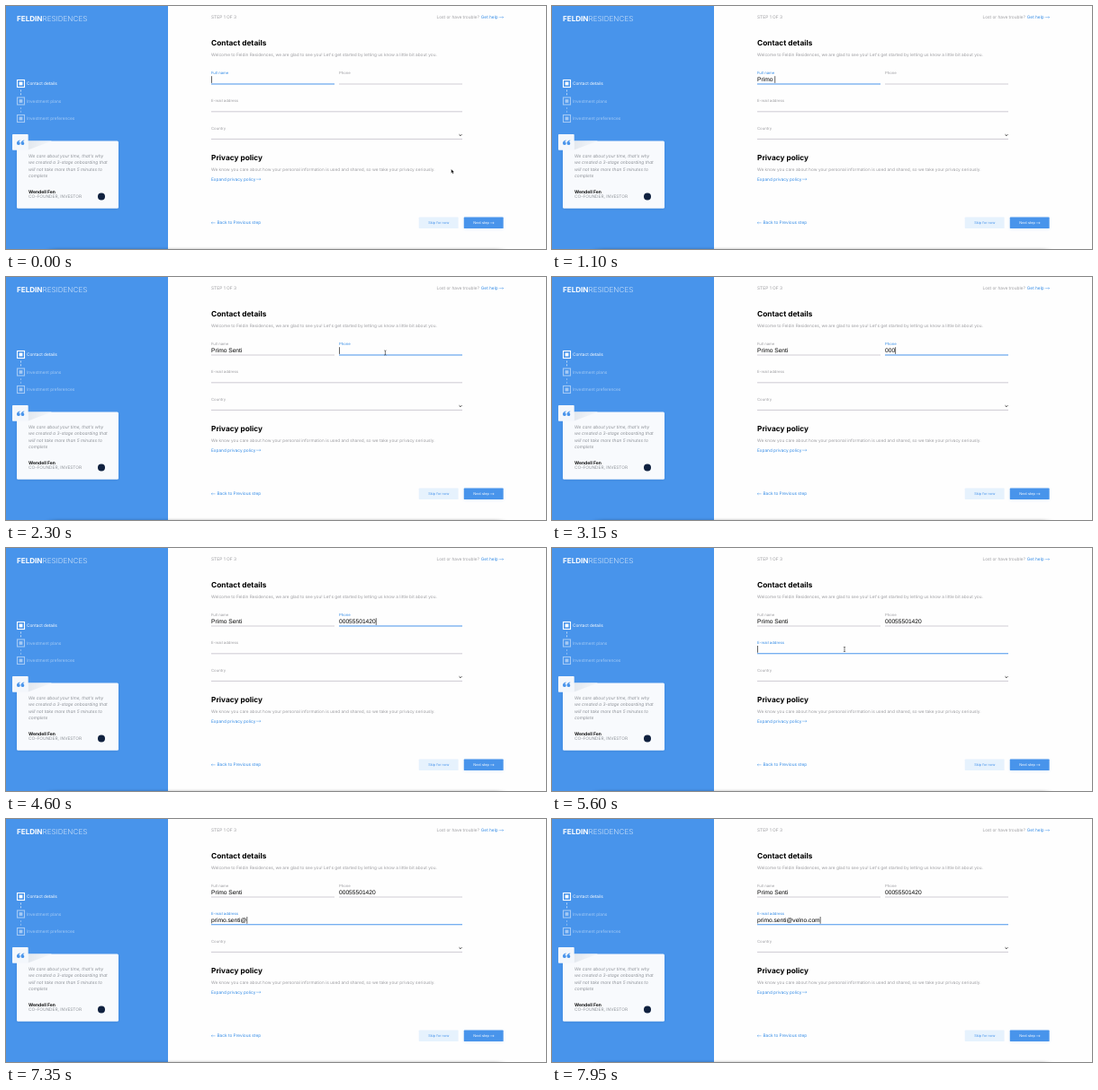
These frames come from a looping animation (600 px wide and 271 px high, 8000 ms). An HTML page:

```html
<!DOCTYPE html>
<html lang="en">
<head>
<meta charset="utf-8">
<title>Onboarding form</title>
<style>
  html, body { margin: 0; width: 100%; height: 100%; overflow: hidden; background: #fefefe; }
  svg { display: block; width: 100%; height: 100%; }
  text { font-family: Inter, sans-serif; white-space: pre; text-rendering: geometricPrecision; }
  .typed { font-family: "Liberation Sans", Arial, sans-serif; font-size: 6.667px; fill: #000; }
</style>
</head>
<body>
<svg id="stage" viewBox="0 0 600 271" xmlns="http://www.w3.org/2000/svg">
  <defs>
    <linearGradient id="fold" x1="0" y1="0" x2="1" y2="0">
      <stop offset="0" stop-color="#e3e8ee"/>
      <stop offset="1" stop-color="#f5f8fc"/>
    </linearGradient>
    <filter id="soft" x="-20%" y="-20%" width="140%" height="150%">
      <feGaussianBlur stdDeviation="1.6"/>
    </filter>
    <filter id="glow" filterUnits="userSpaceOnUse" x="0" y="255" width="600" height="30">
      <feGaussianBlur stdDeviation="5 1.5"/>
    </filter>
  </defs>
</svg>
<script>
const NS = 'http://www.w3.org/2000/svg';
const stage = document.getElementById('stage');
const LOOP = 8000;
const BLUE = '#4894eb', LINK = '#338be6', GRAY = '#9d9da1', RULE = '#c3bfca', WHITE = '#fff';

function add(tag, attrs, parent = stage) {
  const el = document.createElementNS(NS, tag);
  for (const key in attrs) el.setAttribute(key, attrs[key]);
  return parent.appendChild(el);
}

function label(str, x, y, size, fill, more = {}) {
  const el = add('text', { x, y, 'font-size': size, fill, ...more });
  el.textContent = str;
  return el;
}

function rect(x, y, width, height, fill, more = {}) {
  return add('rect', { x, y, width, height, fill, ...more });
}

function rule(x1, x2, y) {
  return add('line', { x1, x2, y1: y, y2: y, stroke: RULE, 'stroke-width': .8 });
}

// Horizontal arrow; a negative length points left.
function arrow(x, y, len, stroke) {
  const tip = x + len, back = tip - Math.sign(len) * 1.2;
  add('path', {
    d: `M${x} ${y}H${tip}M${back} ${y - 1}L${tip} ${y}L${back} ${y + 1}`,
    fill: 'none', stroke, 'stroke-width': .42
  });
}

function drawSidebar() {
  rect(0, 0, 180, 271, BLUE);
  label('FELDIN', 12, 17.4, 8.1, WHITE, { 'font-weight': 700 })
    .insertAdjacentHTML('beforeend', '<tspan font-weight="300" fill-opacity=".72">RESIDENCES</tspan>');

  ['Contact details', 'Investment plans', 'Investment preferences'].forEach((name, i) => {
    const y = 86.5 + i * 19.5;
    const g = add('g', { opacity: i ? .5 : 1 });
    add('rect', { x: 12.5, y: y - 4, width: 8, height: 8, fill: 'none', stroke: WHITE, 'stroke-width': 1.1 }, g);
    add('rect', { x: 14.6, y: y - 1.9, width: 3.8, height: 3.8, fill: WHITE }, g);
    g.append(label(name, 23, y + 1.8, 4.77, WHITE));
    if (i < 2) add('path', {
      d: `M16.5 ${y + 7}v6`, stroke: WHITE, 'stroke-width': .8,
      'stroke-dasharray': '2 1.8', opacity: i ? .45 : .8
    });
  });
}

function drawQuote() {
  rect(12, 152.5, 113, 74, '#1d4f91', { rx: 2, opacity: .18, filter: 'url(#soft)' });
  rect(12, 150.6, 113, 75.1, '#f8fafd', { rx: 1.5 });
  add('path', { d: 'M24.5 150.6H51L24.5 160.5Z', fill: 'url(#fold)' });
  rect(7, 143, 17.7, 17.7, '#f3f7fc', { rx: .8 });
  for (const dx of [0, 4.6]) add('path', {
    d: 'M15.6 149.4C13 149.8 11.9 151.5 11.9 153.1A1.9 1.9 0 1 0 13.9 151.2Q14.3 150.5 15.6 150.2Z',
    transform: `translate(${dx})`, fill: BLUE
  });
  [
    "We care about your time, that's why",
    'we created a 3-stage onboarding that',
    'will not take more than 5 minutes to',
    'complete'
  ].forEach((line, i) => label(line, 25, 168.7 + i * 7.5, 4.86, '#8f9399', { 'font-style': 'italic' }));
  label('Wendell Fen', 25, 208.7, 5, '#111', { 'font-weight': 700 });
  label('CO-FOUNDER, INVESTOR', 25, 214.2, 4.8, '#8f9399');
  add('circle', { cx: 106, cy: 212.6, r: 4, fill: '#10213f' });
}

function drawPage() {
  label('STEP 1 OF 3', 228, 14.2, 4.9, GRAY);
  label('Lost or have trouble?', 478.5, 14.2, 4.77, GRAY);
  label('Get help', 527.8, 14.2, 4.77, LINK);
  arrow(548, 12.6, 4.7, LINK);

  label('Contact details', 228, 43.8, 8.3, '#000', { 'font-weight': 700 });
  label("Welcome to Feldin Residences, we are glad to see you! Let's get started by letting us know a little bit about you.",
    228, 55.6, 4.78, GRAY);
  label('Privacy policy', 228, 172.3, 8.3, '#000', { 'font-weight': 700 });
  label('We know you care about how your personal information is used and shared, so we take your privacy seriously.',
    228, 184.1, 4.78, GRAY);
  label('Expand privacy policy', 228, 194.7, 4.75, LINK);
  arrow(278, 193.2, 5, LINK);

  label('Country', 228, 137.8, 4.25, GRAY);
  rule(228, 507, 148.4);
  add('path', { d: 'M503.6 143.3l1.4 1.4l1.4-1.4', fill: 'none', stroke: '#222', 'stroke-width': .95 });

  arrow(232.5, 241.8, -4.3, LINK);
  label('Back to Previous step', 234.5, 243.4, 4.75, LINK);
  rect(458.7, 235.6, 43.9, 12.5, '#e6f2fd', { rx: .6 });
  label('Skip for now', 469.3, 243.2, 3.9, BLUE);
  rect(509, 236, 43.4, 12.5, BLUE, { opacity: .25, filter: 'url(#soft)' });
  rect(508.8, 235.6, 43.8, 12.5, BLUE, { rx: .6 });
  label('Next step', 519.3, 243.2, 3.9, WHITE);
  arrow(538, 241.9, 4.2, WHITE);
}

// Each field owns the focus from "from" to "to"; keys are the times of its key presses.
const fields = [
  { name: 'Full name', value: 'Primo Senti', x: 228, end: 365, y: 87, from: -400, to: 2300,
    keys: [350, 500, 620, 750, 900, 1100, 1250, 1350, 1450, 1550, 1650] },
  { name: 'Phone', value: '00055501420', x: 370, end: 507, y: 87, from: 2300, to: 5550,
    keys: [2700, 2900, 3150, 3300, 3450, 3600, 3700, 3850, 4000, 4150, 4300] },
  { name: 'E-mail address', value: 'primo.senti@velno.com', x: 228, end: 507, y: 117.8, from: 5550, to: LOOP,
    keys: [5950, 6100, 6250, 6400, 6500, 6600, 6700, 6800, 6900, 7000, 7100, 7250, 7400, 7500, 7600,
      7650, 7710, 7770, 7830, 7890, 7950] }
];

// Mouse trips; the pointer rests at the end until "hide".
const trips = [
  { show: 0, start: 0, stop: 1, hide: 350, a: [494.7, 182], b: [494.7, 182] },
  { show: 1700, start: 1750, stop: 2250, hide: 2700, a: [494.7, 182], b: [421.4, 84.5] },
  { show: 4850, start: 4900, stop: 5450, hide: 5950, a: [421.4, 84.5], b: [325, 113] }
];

drawSidebar();
drawQuote();
drawPage();
for (const f of fields) {
  f.label = label(f.name, f.x, f.y - 11.1, 4.25, GRAY);
  f.rule = rule(f.x, f.end, f.y);
  f.text = label('', f.x, f.y - 2.8, 6.667, '#000', { class: 'typed' });
}
const caret = add('line', { stroke: '#222', 'stroke-width': .7 });
const hand = add('path', {
  d: 'M0 0V4.5L1.1 3.5L1.8 5.2L2.6 4.9L1.9 3.3H3.3Z',
  fill: '#000', stroke: WHITE, 'stroke-width': .25
});
const beam = add('path', {
  d: 'M-1.1-2.6Q0-2.6 0-2Q0-2.6 1.1-2.6M0-2V2M-1.1 2.6Q0 2.6 0 2Q0 2.6 1.1 2.6',
  fill: 'none', stroke: '#222', 'stroke-width': .6
});
rect(50, 271, 500, 6, '#000', { opacity: .3, filter: 'url(#glow)' });

const show = (el, on) => el.setAttribute('visibility', on ? 'visible' : 'hidden');
const ease = p => p * p * (3 - 2 * p);

function drawField(f, t) {
  const typed = f.keys.filter(k => k <= t);
  const focused = t >= f.from && t < f.to;
  f.text.textContent = f.value.slice(0, typed.length);
  f.label.setAttribute('fill', focused ? LINK : GRAY);
  f.rule.setAttribute('stroke', focused ? BLUE : RULE);
  f.rule.setAttribute('stroke-width', focused ? 1.1 : .8);
  if (!focused) return;
  const last = typed.length ? typed[typed.length - 1] : f.from;
  const x = f.x + .5 + (typed.length ? f.text.getComputedTextLength() : 0);
  caret.setAttribute('x1', x);
  caret.setAttribute('x2', x);
  caret.setAttribute('y1', f.y - 8.8);
  caret.setAttribute('y2', f.y - 1.1);
  show(caret, (t - last) % 1000 < 500);
}

function drawMouse(t) {
  const trip = trips.find(m => t >= m.show && t < m.hide);
  show(hand, false);
  show(beam, false);
  if (!trip) return;
  const p = ease(Math.min(1, Math.max(0, (t - trip.start) / (trip.stop - trip.start))));
  const [x, y] = trip.a.map((v, i) => v + (trip.b[i] - v) * p);
  const over = fields.some(f => x >= f.x && x <= f.end && y > f.y - 10 && y < f.y + 1);
  const el = over ? beam : hand;
  el.setAttribute('transform', `translate(${x} ${y})`);
  show(el, true);
}

function draw(t) {
  fields.forEach(f => drawField(f, t));
  drawMouse(t);
}

const begin = performance.now();
function tick() {
  draw((performance.now() - begin) % LOOP);
  requestAnimationFrame(tick);
}
tick();
</script>
</body>
</html>
```
